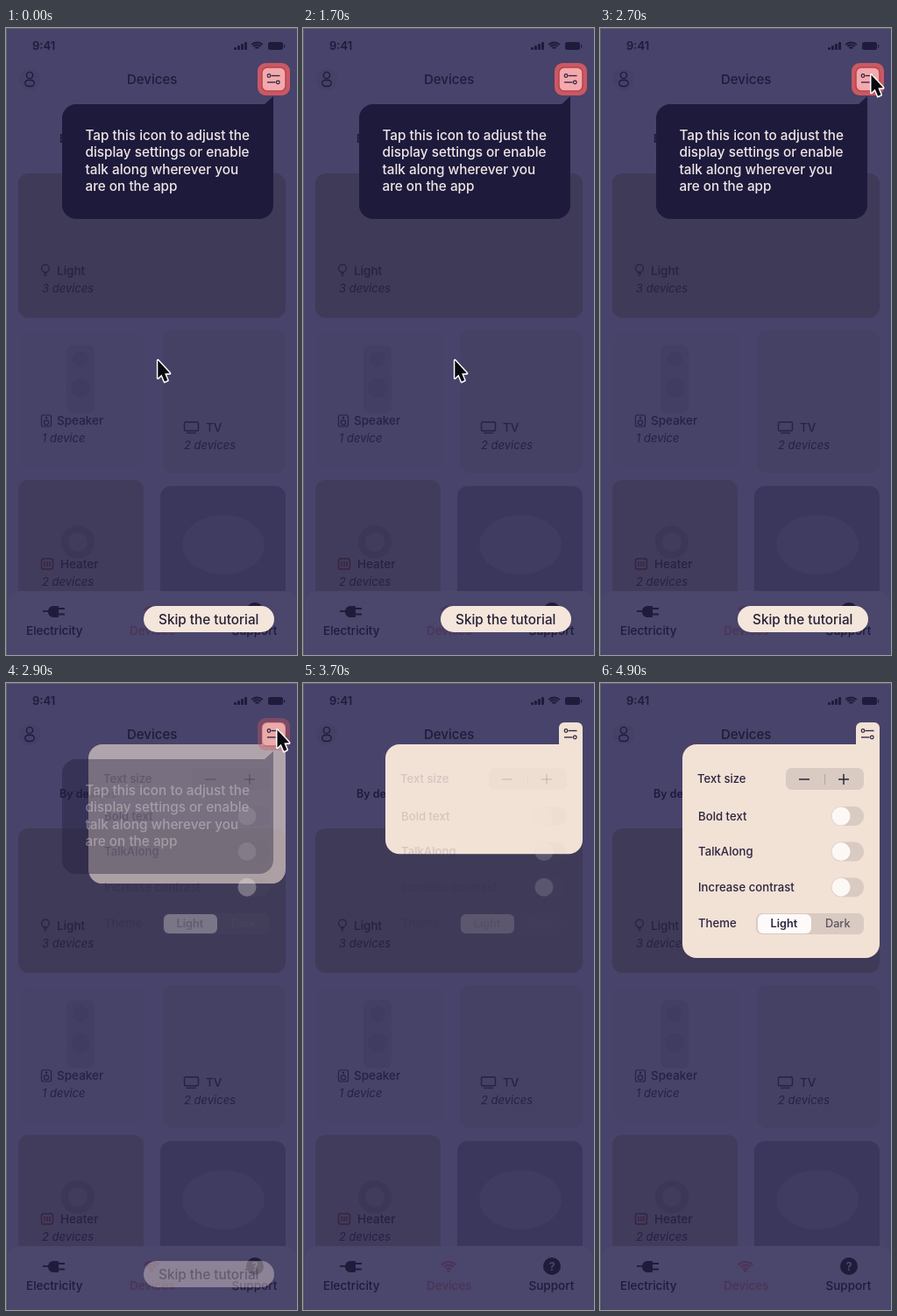
These frames come from a looping animation (332x716 px, 5000 ms). An HTML page with a canvas:

```html
<!DOCTYPE html>
<html lang="en">
<head>
<meta charset="utf-8">
<title>Display settings tutorial</title>
<style>
html, body { margin: 0; width: 100%; height: 100%; overflow: hidden; background: #47436a; }
canvas { display: block; width: 332px; height: 716px; }
</style>
</head>
<body>
<canvas id="stage" width="332" height="716"></canvas>
<script>
const ctx = document.getElementById('stage').getContext('2d');
const LOOP = 5000, REVEAL = 2728, REOPEN = 3559;
const INK = '#1f1b3b', DIM = '#262245', ACCENT = '#4c3455';
const CREAM = '#f2e1d5', TRACK = 'rgba(117, 112, 117, 0.2)';

const clamp = v => Math.max(0, Math.min(1, v));
const smooth = v => { v = clamp(v); return v * v * (3 - 2 * v); };
const mix = (a, b, k) => a + (b - a) * k;

function box(x, y, w, h, r, fill) {
  ctx.beginPath();
  ctx.roundRect(x, y, w, h, r);
  ctx.fillStyle = fill;
  ctx.fill();
}

function dot(x, y, r, fill) {
  ctx.beginPath();
  ctx.arc(x, y, r, 0, Math.PI * 2);
  ctx.fillStyle = fill;
  ctx.fill();
}

function stroke(color, width) {
  ctx.strokeStyle = color;
  ctx.lineWidth = width;
  ctx.stroke();
}

function ring(x, y, r, color, width) {
  ctx.beginPath();
  ctx.arc(x, y, r, 0, Math.PI * 2);
  stroke(color, width);
}

function line(color, width, ...pts) {
  ctx.beginPath();
  for (let i = 0; i < pts.length; i += 2) ctx.lineTo(pts[i], pts[i + 1]);
  stroke(color, width);
}

function outline(x, y, w, h, r, color, width) {
  ctx.beginPath();
  ctx.roundRect(x, y, w, h, r);
  stroke(color, width);
}

function text(str, x, y, size, fill, style = '500') {
  ctx.font = `${style} ${size}px Inter, Roboto, sans-serif`;
  ctx.fillStyle = fill;
  ctx.fillText(str, x, y);
}

function fade(alpha, draw) {
  if (alpha <= 0) return;
  ctx.save();
  ctx.globalAlpha = alpha;
  draw();
  ctx.restore();
}

function wifi(x, y, size, color, width) {
  for (let i = 1; i <= 3; i++) {
    ctx.beginPath();
    ctx.arc(x, y, size * i / 3, -Math.PI * 0.76, -Math.PI * 0.24);
    stroke(color, width);
  }
}

function statusBar() {
  text('9:41', 30, 25, 13, INK, '600');
  for (let i = 0; i < 4; i++) box(260 + i * 4, 22 - i * 2, 3, 3 + i * 2, 1, INK);
  wifi(286.5, 25, 8.5, INK, 2);
  box(299, 16, 17, 9, 2.5, INK);
  box(317, 19, 1.2, 3.5, 0.5, INK);
}

function header() {
  dot(27, 59, 12, '#444066');
  ring(27, 54, 3.6, INK, 1.4);
  outline(21.8, 59.5, 10.4, 7, 3.5, INK, 1.4);
  text('Devices', 138, 64, 15, INK);
  text('By devices', 61, 131, 12.5, INK, '600');
}

function label(name, count, x, nameX, y) {
  text(name, nameX, y, 13.5, DIM);
  text(count, x, y + 20, 13, DIM, 'italic 400');
}

function cards() {
  box(14, 166, 305, 165, 12, '#3f3a57');
  box(16, 348, 143, 154, 12, '#464268');
  box(179, 345, 140, 163, 12, '#454164');
  box(14, 516, 143, 140, 12, '#413c5b');
  box(176, 523, 143, 133, 12, '#3b375c');

  box(69, 362, 32, 78, 8, '#433f64');
  dot(85, 378, 9, '#403c61');
  dot(85, 411, 11, '#403c61');
  ring(82, 587, 15, '#3c3757', 8);
  ctx.beginPath();
  ctx.ellipse(248, 590, 47, 34, 0, 0, Math.PI * 2);
  ctx.fillStyle = '#3f3b61';
  ctx.fill();

  ring(45, 274.5, 4.4, DIM, 1.3);
  line(DIM, 1.5, 43, 280, 47, 280);
  line(DIM, 1.5, 43.5, 282.5, 46.5, 282.5);
  label('Light', '3 devices', 41, 58, 282);

  outline(40.5, 442, 11, 13, 2, DIM, 1.2);
  ring(46, 450.5, 2.6, DIM, 1.2);
  dot(46, 445, 1.2, DIM);
  label('Speaker', '1 device', 41, 58, 453);

  outline(203.5, 450, 16, 10, 1.5, DIM, 1.4);
  line(DIM, 1.3, 206, 462.5, 217, 462.5);
  label('TV', '2 devices', 203, 228, 461);

  const glow = '#38233f';
  outline(40.5, 606, 13, 12, 2.5, glow, 1.4);
  for (let i = 0; i < 3; i++) line(glow, 1.3, 44 + i * 3, 609, 44 + i * 3, 615);
  label('Heater', '2 devices', 41, 62, 617);
}

function navBar() {
  box(2, 643, 330, 85, 14, '#4a466c');
  line(INK, 1.8, 42, 666, 50, 666);
  box(48, 660, 12, 13, [6, 1, 1, 6], INK);
  line(INK, 2, 58, 663, 67, 663);
  line(INK, 2, 58, 669.5, 67, 669.5);
  text('Electricity', 23, 693, 13.5, INK);

  wifi(166, 672, 11, ACCENT, 2.2);
  dot(166, 671.5, 1.6, ACCENT);
  text('Devices', 141, 693, 13.5, ACCENT);

  dot(284, 666, 10, INK);
  text('?', 280.4, 670.8, 13, '#4a466c', '700');
  text('Support', 257.5, 693, 13.5, INK);
}

function page() {
  box(0, 0, 332, 716, 0, '#47436a');
  statusBar();
  header();
  cards();
  navBar();
  box(0, 0, 332, 1, 0, '#63616b');
  box(0, 0, 1, 716, 0, '#63616b');
}

function toggle(y) {
  box(264, y - 11, 37, 22, 11, TRACK);
  dot(275, y, 10.5, '#fcf8f6');
}

function settings() {
  const ink = '#2a243e';
  text('Text size', 111, 114, 13.1, ink);
  box(212, 97, 89, 25, 7, TRACK);
  line(ink, 1.5, 227, 110, 239, 110);
  line('#b5a6a3', 1, 256.5, 104, 256.5, 116);
  line(ink, 1.5, 272, 110, 284, 110);
  line(ink, 1.5, 278, 104, 278, 116);
  ['Bold text', 'TalkAlong', 'Increase contrast'].forEach((name, i) => {
    const y = 152 + i * 40.6;
    text(name, 112, y + 4.5, 13.2, ink);
    toggle(y);
  });
  text('Theme', 112, 279, 13.2, ink);
  box(178, 263, 123, 24, 7, TRACK);
  box(180, 264, 61, 22, 6, '#fdfaf9');
  text('Light', 194.5, 279, 12.7, ink, '600');
  text('Dark', 257, 279, 12.7, '#5b5261');
}

function panel(open) {
  box(94, 70, 225, mix(24, 244, open), [16, 0, 16, 16], CREAM);
  fade(open ** 2.5, settings);
}

function tooltip() {
  ctx.beginPath();
  ctx.moveTo(305, 78);
  ctx.lineTo(295, 87);
  ctx.lineTo(80, 87);
  ctx.arcTo(64, 87, 64, 103, 16);
  ctx.arcTo(64, 218, 80, 218, 16);
  ctx.arcTo(305, 218, 305, 202, 16);
  ctx.closePath();
  ctx.fillStyle = '#1e1a3b';
  ctx.fill();
  ['Tap this icon to adjust the', 'display settings or enable', 'talk along wherever you', 'are on the app']
    .forEach((row, i) => text(row, 90.5, 127.5 + i * 19.5, 15.3, '#efe6e6'));
}

function highlight() {
  box(287, 40, 37, 37, 9, '#cb5863');
  box(292, 45, 27, 27, 6, '#f4a9ad');
  outline(292, 45, 27, 27, 6, '#b5444f', 1.5);
}

function skipButton() {
  box(157, 660, 149, 30, 15, '#f5e6db');
  text('Skip the tutorial', 174, 680.5, 15.3, '#252037');
}

function sliders() {
  const ink = '#2a2440';
  ring(300, 54.5, 1.8, ink, 1.2);
  line(ink, 1.3, 302.5, 54.5, 312.5, 54.5);
  line(ink, 1.3, 298, 62, 307.5, 62);
  ring(310.3, 62, 1.8, ink, 1.2);
}

function cursor(x, y) {
  ctx.save();
  ctx.translate(x, y);
  ctx.scale(0.85, 0.9);
  ctx.beginPath();
  [[0, 0], [0, 22.5], [5, 18], [9, 27], [13, 25.3], [9.2, 16.8], [16, 16.5]]
    .forEach(p => ctx.lineTo(...p));
  ctx.closePath();
  ctx.lineJoin = 'round';
  stroke('#fff', 3.4);
  ctx.fillStyle = '#0b0910';
  ctx.fill();
  ctx.restore();
}

function draw(t) {
  const reveal = smooth((t - REVEAL) / 300);
  const reopened = t >= REOPEN;

  page();
  fade(reveal, () => panel(reopened ? smooth((t - REOPEN) / 300) : reveal));
  box(292, 45, 27, 26, [6, 6, 0, 0], CREAM);
  fade(1 - reveal, () => {
    tooltip();
    highlight();
    skipButton();
  });
  sliders();
  if (!reopened) {
    const k = smooth((t - 1900) / 650);
    cursor(mix(173.3, 309.5, k), mix(379.5, 53.5, k));
  }
}

const start = performance.now();
function tick() {
  draw((performance.now() - start) % LOOP);
  requestAnimationFrame(tick);
}
tick();
</script>
</body>
</html>
```
